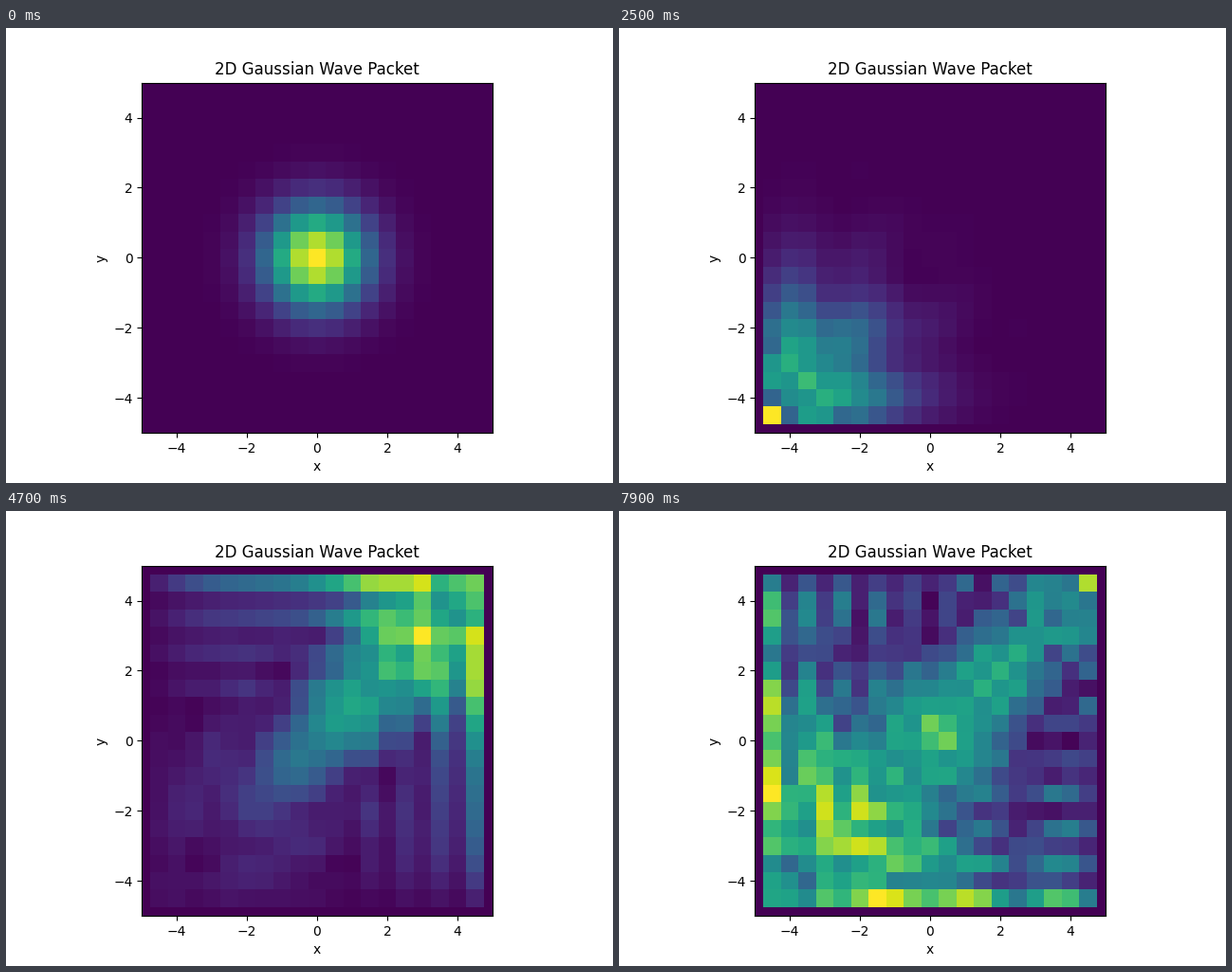
A matplotlib script for the animation above (8 s loop, 640 by 480 pixels).

```python
import numpy as np
import matplotlib.pyplot as plt
from matplotlib.animation import FuncAnimation

HALF = 5.0       # box runs from -HALF to HALF on both axes
DX = 0.5
DT = 0.1
SIGMA = 1.0
K0 = 10.0        # above the grid limit, so the packet travels backwards
FRAMES = 80

x = np.arange(-HALF, HALF + DX / 2, DX)
n = len(x) - 1
X, Y = np.meshgrid(x, x)
psi0 = np.exp(-(X**2 + Y**2) / (2 * SIGMA**2) + 1j * K0 * (X + Y))

# Sine modes of the grid with zero walls
m = np.arange(1, n)
modes = np.sqrt(2 / n) * np.sin(np.pi * np.outer(m, m) / n)
coef = modes @ psi0[1:-1, 1:-1] @ modes

# Crank-Nicolson phase of one step for every pair of modes
energy = 2 * (1 - np.cos(np.pi * m / n)) / DX**2
u = (energy[:, None] + energy[None, :]) * DT / 2
phase = -2 * np.arctan(u)


def amplitude(step):
    psi = np.zeros_like(psi0)
    psi[1:-1, 1:-1] = modes @ (coef * np.exp(1j * phase * step)) @ modes
    return np.abs(psi)


fig, ax = plt.subplots(figsize=(6.4, 4.8), dpi=100)
mesh = ax.pcolormesh(X, Y, amplitude(0), shading="nearest", cmap="viridis")
ax.set_aspect("equal")
ax.set_xlim(-HALF, HALF)
ax.set_ylim(-HALF, HALF)
ax.set_title("2D Gaussian Wave Packet")
ax.set_xlabel("x")
ax.set_ylabel("y")


def update(step):
    z = amplitude(step)
    mesh.set_array(z)
    mesh.set_clim(z.min(), z.max())
    return (mesh,)


anim = FuncAnimation(fig, update, frames=FRAMES, interval=100, repeat=True,
                     repeat_delay=0, blit=False)
plt.show()
```
